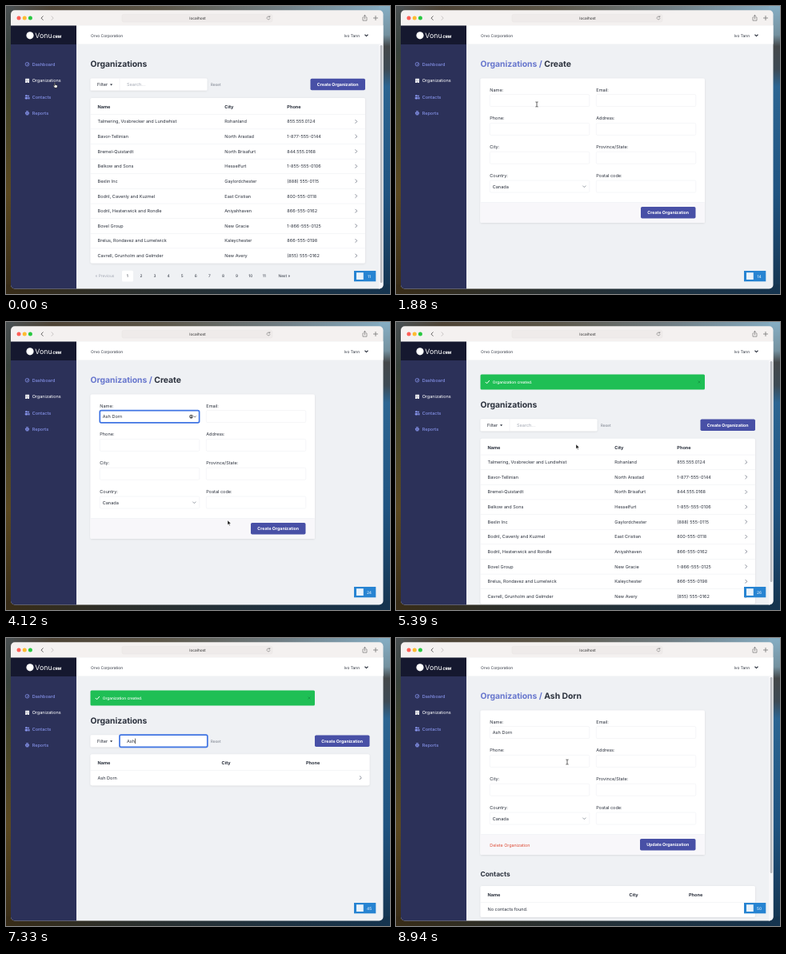
Write an HTML page that moves like this. It is 480 by 360 pixels and loops after 8.97 s.

```html
<!DOCTYPE html>
<html lang="en">
<head>
<meta charset="utf-8">
<title>Organizations</title>
<style>
html, body { margin: 0; width: 100%; height: 100%; overflow: hidden; background: #1d3340; }
svg { display: block; width: 480px; height: 360px; }
text { font-family: Inter, "Open Sans", sans-serif; white-space: pre; text-rendering: geometricPrecision; }
</style>
</head>
<body>
<svg viewBox="0 0 480 360" xmlns="http://www.w3.org/2000/svg">
  <defs>
    <linearGradient id="top"><stop stop-color="#4a5052"/><stop offset=".12" stop-color="#4d4335"/><stop offset=".4" stop-color="#5c5648"/><stop offset=".7" stop-color="#6f7b80"/><stop offset="1" stop-color="#86aec4"/></linearGradient>
    <linearGradient id="left" x2="0" y2="1"><stop stop-color="#4a5052"/><stop offset=".15" stop-color="#38423c"/><stop offset=".35" stop-color="#464529"/><stop offset=".65" stop-color="#5b4820"/><stop offset="1" stop-color="#382c17"/></linearGradient>
    <linearGradient id="right" x2="0" y2="1"><stop stop-color="#86aec4"/><stop offset=".1" stop-color="#74919f"/><stop offset=".14" stop-color="#44484a"/><stop offset=".22" stop-color="#3d4a54"/><stop offset=".28" stop-color="#2c6592"/><stop offset=".65" stop-color="#1f5380"/><stop offset="1" stop-color="#15344f"/></linearGradient>
    <linearGradient id="bottom"><stop stop-color="#382c17"/><stop offset=".3" stop-color="#2c2f2b"/><stop offset="1" stop-color="#15344f"/></linearGradient>
    <clipPath id="frame"><rect x="6" y="5.3" width="465.5" height="348.2" rx="5"/></clipPath>
    <filter id="soft" x="-10%" y="-10%" width="120%" height="130%"><feDropShadow dx="0" dy=".6" stdDeviation=".9" flood-opacity=".11"/></filter>
  </defs>
  <rect width="480" height="10" fill="url(#top)"/>
  <rect width="10" height="360" fill="url(#left)"/>
  <rect x="466" width="14" height="360" fill="url(#right)"/>
  <rect y="348" width="480" height="12" fill="url(#bottom)"/>
  <g clip-path="url(#frame)">
    <g id="chrome"></g>
    <g id="page"></g>
    <g id="badge"></g>
  </g>
  <path id="pointer" stroke-linejoin="round" stroke-linecap="round"/>
</svg>
<script>
const LOOP = 8970;
const INK = '#2b313d', INDIGO = '#4850a6', NAVY = '#2c3159', LINE = '#eaecf1';
const NAME = 'Ash Dorn', QUERY = 'Ash';

const CREATE = 1420, FOCUS = 2100, CREATED = 4650, SEARCH = 5800, FOUND = 6750, EDIT = 8330;
const nameKeys = Array.from(NAME, (_, i) => 2400 + 150 * i);
const queryKeys = [5950, 6100, 6250];

const orgs = [
  ['Talmering, Vosbrecker and Lundwhist', 'Rohanland', '855.555.0124'],
  ['Bavor-Tellinian', 'North Arastad', '1-877-555-0144'],
  ['Bremel-Quistardt', 'North Brisafurt', '844.555.0168'],
  ['Belkow and Sons', 'Hesselfurt', '1-855-555-0106'],
  ['Bexlin Inc', 'Gaylordchester', '(888) 555-0115'],
  ['Bodril, Cavenly and Kuzmel', 'East Cristian', '800-555-0118'],
  ['Bodril, Hestenwick and Rondle', 'Aniyahhaven', '866-555-0162'],
  ['Bovel Group', 'New Gracie', '1-866-555-0125'],
  ['Brelus, Rondavez and Lumelwick', 'Kaleychester', '866-555-0198'],
  ['Cavrell, Grunholm and Gelmder', 'New Avery', '(855) 555-0162']
];

// Time, x, y of the pointer
const path = [
  [0, 61, 96], [300, 61, 96], [1050, 408, 98], [1350, 408, 98], [1860, 176, 123],
  [2100, 176, 121], [3650, 176, 121], [4120, 277, 248], [4400, 335, 258], [4700, 335, 258],
  [5390, 225, 153], [5700, 200, 129], [7450, 200, 129], [7950, 192, 175], [8330, 192, 175], [8750, 214, 155]
];
const counts = [
  [0, 11], [1350, 12], [CREATE, 14], [FOCUS, 16], ...nameKeys.map((t, i) => [t, 17 + i]),
  [4500, 25], [CREATED, 26], [SEARCH, 28], [5950, 31], [6100, 34], [6250, 37],
  [FOUND, 42], [6800, 45], [8200, 47], [EDIT, 50]
];

const $ = id => document.getElementById(id);
const rect = (x, y, w, h, fill, rx = 0, more = '') =>
  `<rect x="${x}" y="${y}" width="${w}" height="${h}" rx="${rx}" fill="${fill}" ${more}/>`;
const text = (x, y, s, size = 5.55, fill = INK, weight = 400, more = '') =>
  `<text x="${x}" y="${y}" font-size="${size}" fill="${fill}" font-weight="${weight}" ${more}>${s}</text>`;
const stroke = (d, color, w = .7) =>
  `<path d="${d}" fill="none" stroke="${color}" stroke-width="${w}" stroke-linecap="round" stroke-linejoin="round"/>`;
const dot = (x, y, r, fill, more = '') => `<circle cx="${x}" cy="${y}" r="${r}" fill="${fill}" ${more}/>`;
const middle = 'text-anchor="middle"';
const shadow = 'filter="url(#soft)"';
const down = (x, y, c, w) => stroke(`M${x - 1.7} ${y - .8}l1.7 1.7 1.7-1.7`, c, w);
const next = (x, y) => stroke(`M${x - 1} ${y - 2}l2 2-2 2`, '#6b7280', .8);
const button = (x, y, w, label) =>
  rect(x, y, w, 14.5, INDIGO, 1.8) + text(x + w / 2, y + 9.1, label, 5.3, '#fff', 700, middle);
const heading = (y, s) => text(105.5, y, s, 10.35, INK, 700);

function chrome() {
  let s = rect(6, 5, 466, 20, '#f4f1f0') + rect(6, 24.5, 466, 330, '#eff1f4');
  ['#fe5f57', '#febc2e', '#28c840'].forEach((c, i) => s += dot(16 + 7.2 * i, 15, 2.5, c));
  s += stroke('M46.2 12.8l-2.2 2.3 2.2 2.3', '#555', .9) + stroke('M57 12.8l2.2 2.3-2.2 2.3', '#c4c1c0', .9)
    + rect(145, 10.3, 188, 9.8, '#efebea', 2.2, 'stroke="#e6e2e1" stroke-width=".4"')
    + text(239.5, 17, 'localhost', 4.7, '#444', 500, middle)
    + stroke('M329.6 13.6a2 2 0 1 0 .4 2M329.8 12.4v1.4h-1.4', '#777', .6)
    + stroke('M447 14h-1v4.2h5V14h-1M448.5 16v-4.6m-1.3 1.2l1.3-1.3 1.3 1.3', '#666', .6)
    + stroke('M462 12.4v5.2M459.4 15h5.2', '#666', .7);
  s += rect(88, 24.5, 384, 23, '#fff') + rect(6, 24.5, 82, 23.5, '#15182f') + rect(6, 48, 82, 306, NAVY);
  s += dot(30, 36.8, 4.6, '#fff') + text(36.3, 40.2, 'Vonu', 8.8, '#fff', 400)
    + text(58.3, 40.2, 'CRM', 4.6, '#fff', 800, 'font-style="italic"');
  s += text(106, 38.8, 'Orvo Corporation', 4.9) + text(422.5, 38.8, 'Ivo Tann', 4.9) + down(450.5, 36.8, INK, 1.1);
  const dim = '#8390e6';
  ['Dashboard', 'Organizations', 'Contacts', 'Reports'].forEach((label, i) =>
    s += text(32.7, 74.8 + 20.5 * i, label, 5.5, i === 1 ? '#fff' : dim, i === 1 ? 400 : 500));
  s += dot(26.5, 72.8, 2.3, 'none', `stroke="${dim}" stroke-width=".8"`) + stroke('M26.5 73.8l1-2', dim)
    + rect(24.2, 90.7, 4.8, 5.4, '#fff', .3) + stroke('M25.6 92h.1M27.5 92h.1M25.6 93.6h.1M27.5 93.6h.1M26.5 96v-1', NAVY, .6)
    + dot(25.4, 112.3, 1.3, dim) + dot(28, 112.6, 1, dim) + rect(23.7, 114, 3.6, 2.4, dim, .8) + rect(27.7, 114, 1.8, 2.4, dim, .6)
    + rect(24, 132.8, 5, 2.8, dim, .6) + rect(25, 131.2, 3, 1.1, dim) + rect(25, 134.6, 3, 2, dim, 0, `stroke="${NAVY}" stroke-width=".4"`);
  return s;
}

const scrollbar = h => rect(466, 47.5, 6, 307, '#f7f7f9') + rect(467.8, 49, 2.6, h, '#b9bbc0', 1.3);

function table(y, right, cols, rows, h) {
  let s = rect(105.5, y, right - 105.5, h, '#fff', 2, shadow);
  ['Name', 'City', 'Phone'].forEach((c, i) => s += text(cols[i], y + 13, c, 5.6, INK, 700));
  rows.forEach((row, r) => {
    const top = y + 20 + 18.63 * r;
    s += rect(105.5, top, right - 105.5, .5, LINE);
    row.forEach((v, i) => s += text(cols[i], top + 11.4, v));
    if (row.length > 1) s += next(right - 11.2, top + 9.4);
  });
  return s;
}

function field(x, y, w, value, focused, caret) {
  return (focused ? rect(x, y, w, 15.2, '#fff', 1.8, 'stroke="#3f74e3" stroke-width="1.7"') : '')
    + text(x + (w < 115 ? 9 : 3.5), y + 9.7, value, 5.55, INK, 400, caret ? 'class="typed"' : '');
}

function list(flash, filtered, query, focused, caret) {
  const dy = flash ? 30.8 : 0, right = filtered ? 454.5 : 449;
  let s = filtered ? '' : scrollbar(flash ? 276 : 297);
  if (flash) s += rect(105.5, 65.5, 280.5, 19, '#1fbf55', 1.5)
    + stroke('M112 75.2l1.6 1.6 3-3.4', '#fff', 1) + text(120.7, 76.8, 'Organization created.', 4.83, '#fff', 500)
    + stroke('M377.8 73.8l2.4 2.4m0-2.4l-2.4 2.4', '#168f40', .7);
  s += heading(76 + dy, 'Organizations') + rect(105.5, 90.5 + dy, 146, 15, '#fff', 1.5, shadow)
    + rect(141.8, 90.5 + dy, .5, 15, LINE) + text(114, 100 + dy, 'Filter')
    + `<path d="M130 ${97.4 + dy}h3.2l-1.6 2z" fill="${INK}"/>`
    + field(142, 90.3 + dy, 109.8, query, focused, caret)
    + (query ? '' : text(151, 100 + dy, 'Search...', 5.5, '#a3a8b3'))
    + text(255.7, 99.8 + dy, 'Reset', 4.83, '#7b818d') + button(right - 68.5, 90.7 + dy, 68.5, 'Create Organization');
  if (filtered) return s + table(145.3, right, [114.5, 269.5, 375], [[NAME, '', '']], 39);
  s += table(115 + dy, right, [114.5, 273.3, 351.3], orgs, 206.5);
  s += text(111.5, 339 + dy, '« Previous', 4.83, '#a3a8b3') + rect(145, 330.8 + dy, 14, 13.6, '#fff', 1.5);
  for (let i = 0; i < 11; i++) s += text(151.8 + 17.1 * i, 339 + dy, i + 1, 4.83, INK, 400, middle);
  return s + text(340.5, 339 + dy, 'Next »', 4.83);
}

function form(edit, value, focused, caret) {
  let s = edit ? scrollbar(245) : '';
  s += heading(76, `<tspan fill="#6776cd">Organizations /</tspan> ${edit ? NAME : 'Create'}`)
    + rect(105.5, 90.5, 280.5, 180.5, '#fff', 2, shadow) + rect(105.5, 245, 280.5, 26, '#f8f7fa', 2) + rect(105.5, 245, 280.5, .4, LINE);
  ['Name', 'Email', 'Phone', 'Address', 'City', 'Province/State', 'Country', 'Postal code'].forEach((label, i) => {
    const x = i % 2 ? 250.3 : 117.3, y = 110.6 + 35.8 * (i >> 1);
    s += text(x, y - 4, label + ':') + rect(x, y, 124.5, 15, '#fff', 1.5, `stroke="${LINE}" stroke-width=".5"`);
  });
  s += field(117.3, 110.6, 124.3, value, focused, caret) + text(120.7, 227.8, 'Canada') + down(235.3, 225.7, '#6b7280');
  if (focused) s += dot(231.5, 118.2, 2, '#fff', 'stroke="#333" stroke-width=".8"') + dot(231.5, 117.7, .8, '#333')
    + rect(230.1, 118.8, 2.8, 1.2, '#333', .6) + stroke('M235 117.8l1.2 1.1 1.2-1.1', '#333', .7);
  if (!edit) return s + button(306, 251, 68.5, 'Create Organization');
  return s + text(117.3, 260.5, 'Delete Organization', 5.4, '#dd4b35') + button(305, 251, 69.5, 'Update Organization')
    + text(105.5, 298, 'Contacts', 8.4, INK, 700)
    + table(310, 449, [114.5, 291.5, 366], [['No contacts found.']], 39);
}

const typed = (keys, t) => keys.filter(k => k <= t).length;
const caretOn = (start, keys, t) => {
  const last = Math.max(start, ...keys.filter(k => k <= t));
  return (t - last) % 1060 < 530;
};

function page(t) {
  if (t < CREATE) return list(false, false, '', false, false);
  if (t < CREATED) {
    const focused = t >= FOCUS && t < 4500;
    return form(false, NAME.slice(0, typed(nameKeys, t)), focused, focused && caretOn(FOCUS, nameKeys, t));
  }
  if (t < EDIT) {
    const focused = t >= SEARCH && t < 8200;
    return list(true, t >= FOUND, QUERY.slice(0, typed(queryKeys, t)), focused, focused && caretOn(SEARCH, queryKeys, t));
  }
  return form(true, NAME, false, false);
}

const badge = n => rect(435, 331, 27.3, 13.3, '#2784d2') + rect(438, 333.2, 8.8, 8.8, '#e9f3fb')
  + text(454, 339.5, n, 4.9, '#fff', 400, middle);

const shapes = {
  arrow: ['M0 0v5.6l1.4-1.2.9 2 .9-.4-.9-1.9h1.8z', '#111', '#fff', .5],
  hand: ['M-.6 0q.7-.6 1 .2v2.2l2.2.5q.8.3.7 1.2l-.5 2.2h-3l-1.8-2.6q.2-.8 1.4.1z', '#fff', '#111', .6],
  beam: ['M-1.2-3q1 0 1.2.6q.2-.6 1.2-.6M0-2.4v4.8M-1.2 3q1 0 1.2-.6q.2.6 1.2.6', 'none', '#222', .7]
};

function shapeAt(t, x, y) {
  const inside = (l, r, a, b) => x > l && x < r && y > a && y < b;
  if (t < CREATE) return inside(20, 72, 88, 100) || inside(380, 449, 90, 106) ? 'hand' : inside(142, 251, 90, 106) ? 'beam' : 'arrow';
  if (t >= CREATED && t < EDIT) {
    if (inside(142, 251, 121, 137)) return 'beam';
    return inside(105, 449, 165, 354) ? 'hand' : 'arrow';
  }
  if (inside(306, 375, 251, 266)) return 'hand';
  const row = (y - 110.6) % 35.8;
  const overField = row > 0 && row < 15 && y < 241 && (inside(117, 242, 110, 241) || inside(250, 375, 110, 241));
  return overField ? 'beam' : 'arrow';
}

function movePointer(t) {
  const i = path.findLastIndex(p => p[0] <= t), [t0, x0, y0] = path[i], [t1, x1, y1] = path[i + 1] || [LOOP, x0, y0];
  const p = (t - t0) / (t1 - t0), e = p * p * (3 - 2 * p);
  const x = x0 + (x1 - x0) * e, y = y0 + (y1 - y0) * e;
  const [d, fill, line, width] = shapes[shapeAt(t, x, y)];
  const hidden = t > nameKeys[0] && t < 3650 || t > queryKeys[0] && t < 7450;
  const attrs = { d, fill, stroke: line, 'stroke-width': width, transform: `translate(${x} ${y})`, visibility: hidden ? 'hidden' : 'visible' };
  for (const k in attrs) $('pointer').setAttribute(k, attrs[k]);
}

const shown = {};
function show(id, html) {
  if (shown[id] === html) return;
  $(id).innerHTML = shown[id] = html;
  const el = $(id).querySelector('.typed');
  if (!el) return;
  const x = +el.getAttribute('x') + el.getComputedTextLength() + .3, y = +el.getAttribute('y');
  $(id).insertAdjacentHTML('beforeend', rect(x, y - 5.2, .7, 6.6, '#222'));
}

show('chrome', chrome());
const start = performance.now();
function draw() {
  const t = (performance.now() - start) % LOOP;
  show('page', page(t));
  show('badge', badge(counts.findLast(c => c[0] <= t)[1]));
  movePointer(t);
  requestAnimationFrame(draw);
}
draw();
</script>
</body>
</html>
```
